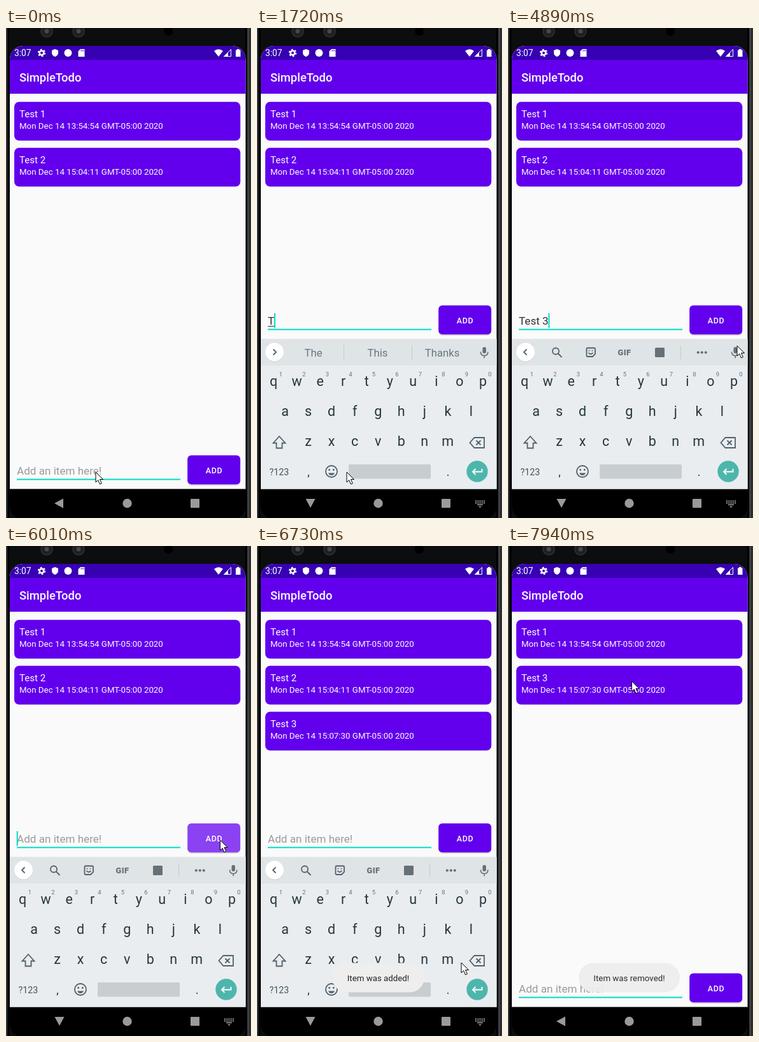
These frames come from a looping animation (385 by 768 pixels, 8000 ms). An HTML page:

```html
<!DOCTYPE html>
<html lang="en">
<head>
<meta charset="utf-8">
<title>SimpleTodo</title>
<style>
  html, body { margin: 0; width: 100%; height: 100%; overflow: hidden; background: #000; }
  svg { display: block; width: 100vw; height: 100vh; font-family: Roboto, sans-serif; }
  .mid { text-anchor: middle; }
  .line { fill: none; stroke: #52616a; stroke-width: 1.8; }
  .white { fill: #fff; }
  .tool { fill: #667177; }
  .key { fill: #26363e; font-size: 21.5px; text-anchor: middle; }
  .num { fill: #65737a; font-size: 9.5px; text-anchor: middle; }
  .word { fill: #6a767c; font-size: 16.7px; text-anchor: middle; }
  .field { font-size: 17.1px; white-space: pre; }
</style>
</head>
<body>
<svg viewBox="0 0 385 768" preserveAspectRatio="none">
  <defs><clipPath id="screen"><rect x="6" y="28" width="370.5" height="742" rx="21"/></clipPath></defs>

  <!-- phone body -->
  <rect width="385" height="768" fill="#0c0d0e"/>
  <path d="M1 0V768" stroke="#35373a" stroke-width="2"/>
  <path d="M382 0V768" stroke="#2c2e30" stroke-width="6"/>
  <path d="M380.500 0V768" stroke="#57595b"/>
  <path d="M4 0V768M377.500 0V768" stroke="#000" stroke-width="3"/>
  <g fill="#1d1f21" stroke="#303234" stroke-width="1.500">
    <circle cx="64" cy="5" r="9"/><circle cx="114" cy="5" r="9"/>
  </g>
  <g fill="#44484b"><circle cx="64" cy="5" r="3.500"/><circle cx="114" cy="5" r="3.500"/></g>
  <circle cx="255" cy="5" r="7" fill="#000"/>

  <g clip-path="url(#screen)">
    <rect x="6" y="28" width="371" height="695" fill="#fafafa"/>
    <rect x="6" y="28" width="371" height="22" fill="#3700b3"/>
    <rect x="6" y="50" width="371" height="53" fill="#6200ee"/>

    <!-- status bar -->
    <g class="white">
      <text x="13" y="44" font-size="13.800">3:07</text>
      <g fill="none" stroke="#fff">
        <circle cx="56" cy="39" r="3.300" stroke-width="2.500"/>
        <circle cx="56" cy="39" r="5.200" stroke-width="2" stroke-dasharray="2.700 2.745"/>
      </g>
      <path d="M77 33l5 2v4q0 4-5 6q-5-2-5-6v-4z"/>
      <circle cx="97.500" cy="39" r="6"/>
      <path d="M117 33h6.500v12h-10v-8.500z"/>
      <path d="M118 34.500v2m2-2v2m2-2v2" stroke="#3700b3"/>
      <path d="M327 36q7-5.500 14 0l-7 9z"/>
      <path d="M353.500 33.500v11h-11z" fill="none" stroke="#fff"/>
      <path d="M349 38v6.500h-6.500z"/>
      <path d="M361 34.500h2v-1.500h3.500v1.500h2v10.500h-7.500z"/>
      <text x="21" y="83.500" font-size="18.400" font-weight="500">SimpleTodo</text>
    </g>

    <g id="items"></g>

    <!-- entry row -->
    <g id="entry">
      <path d="M17 472.500H274" stroke="#03dac5" stroke-width="1.800"/>
      <text id="field" class="field" x="17" y="465"></text>
      <path id="composing" stroke="#333" d=""/>
      <rect id="caret" y="447" width="2" height="23" fill="#03dac5"/>
      <rect x="285.500" y="437" width="82.500" height="45" rx="6" fill="#000" opacity=".16"/>
      <rect id="button" x="285.200" y="434.800" width="83" height="45.400" rx="6"/>
      <text class="mid white" x="327" y="462.500" font-size="12.500" font-weight="500" letter-spacing=".6">ADD</text>
    </g>

    <!-- navigation bar -->
    <rect x="6" y="722.500" width="371" height="46" fill="#000"/>
    <g fill="#9a9a9a">
      <path id="back" d="M76 745l14-7.500v15z"/>
      <circle cx="190.500" cy="745" r="7.200"/>
      <rect x="290" y="738" width="14" height="14" rx="1"/>
      <g id="imeIcon">
        <path d="M343 741.500h15M343 744.500h15" stroke="#9a9a9a" stroke-width="1.800" stroke-dasharray="2 1.250"/>
        <path d="M346 746.500h9v1.600h-9zM348 749.500h5l-2.500 2.500z"/>
      </g>
    </g>

    <!-- keyboard -->
    <g id="keyboard">
      <rect x="6" y="487.500" width="371" height="235" fill="#e9edf0"/>
      <rect x="6" y="487.500" width="371" height="41.500" fill="#dfe4e7"/>
      <circle cx="27.500" cy="509" r="14.500" fill="#b9c0c4" opacity=".6"/>
      <circle cx="27.500" cy="508" r="14.500" class="white"/>
      <path id="chevron" class="line"/>
      <g class="tool">
        <rect x="354.500" y="500" width="5.500" height="10" rx="2.700"/>
        <path d="M351.500 507.500q0 6 5.700 6t5.700-6M357.200 513.500v4" fill="none" stroke="#667177" stroke-width="1.600"/>
      </g>
      <g id="tools" class="tool">
        <circle class="line" cx="75" cy="506.500" r="5"/><path class="line" d="M78.500 510l6 6"/>
        <path class="line" d="M125 501.500h10.500q1.500 0 1.500 1.500v8l-4 4h-8q-1.500 0-1.500-1.500v-10.500q0-1.500 1.500-1.500z"/>
        <path class="line" d="M126.500 509q3.500 4 7 0M127.500 505v1.500m5-1.500v1.500" stroke-width="1.400"/>
        <text class="mid" x="183" y="512.500" font-size="12.800" font-weight="900" letter-spacing=".5">GIF</text>
        <rect x="231" y="501" width="15" height="15" rx="1.500"/>
        <path d="M271.500 498v21" stroke="#c5cbcf"/>
        <circle cx="298.800" cy="508.500" r="2.100"/><circle cx="304.800" cy="508.500" r="2.100"/><circle cx="310.800" cy="508.500" r="2.100"/>
      </g>
      <g id="words">
        <path d="M136.500 497v23M243.500 497v23" stroke="#c5cbcf"/>
        <text class="word" x="88.500" y="515"></text>
        <text class="word" x="189.500" y="515"></text>
        <text class="word" x="291" y="515"></text>
      </g>
      <g id="keys"></g>
      <path class="line" d="M35 640l-9.500 10.500h5v8h9v-8h5z"/>
      <path class="line" d="M341.500 642h15.500v16h-15.500l-7-8zM344.500 646.500l7 7m0-7l-7 7"/>
      <text x="19.500" y="700.500" font-size="14.200" fill="#43535b">?123</text>
      <text class="key" x="81" y="702" style="font-size:18px">,</text>
      <text class="key" x="300" y="702" style="font-size:18px">.</text>
      <circle class="line" cx="117" cy="695" r="9"/>
      <path d="M112 697.500h10q-1.500 3.500-5 3.500t-5-3.500z" fill="#52616a"/>
      <circle cx="113.700" cy="692.500" r="1.400" fill="#52616a"/><circle cx="120.300" cy="692.500" r="1.400" fill="#52616a"/>
      <rect x="144" y="684" width="129" height="22.500" rx="2" fill="#c8cdd0"/>
      <circle cx="346" cy="695" r="16.700" fill="#4db6ac"/>
      <path d="M353.500 691v4.500h-14.500m4.500-4.500l-4.500 4.500l4.500 4.500" fill="none" stroke="#fff" stroke-width="1.900"/>
    </g>

    <g id="toast">
      <rect id="pill" y="653.500" height="46" rx="23" fill="#eeeeee"/>
      <text class="mid" x="190.500" y="682" font-size="13.300" fill="#222"></text>
    </g>
  </g>

  <path id="cursor" d="M0 0V16l3.700-3.500l2.800 6.500l2.800-1.200l-2.800-6.300h5z" fill="#fff" stroke="#000" stroke-width="1"/>
</svg>

<script>
const LOOP = 8000;
const $ = id => document.getElementById(id);
const set = (el, attrs) => { for (const k in attrs) el.setAttribute(k, attrs[k]); };

// Value of the last [time, value] step already reached.
const at = (steps, t) => steps.reduce((value, s) => s[0] <= t ? s[1] : value, steps[0][1]);

const entries = [[0, ''], [1720, 'T'], [2540, 'Te'], [2690, 'Tes'], [3110, 'Test'],
  [3240, 'Test '], [4500, 'Test 3'], [6010, '']];
const suggestions = [[0, ''], [1720, 'The,This,Thanks'], [2540, 'Te,Tell,Team'],
  [2690, 'Test,Tests,Testing'], [3110, 'Test,Testing,Tests'], [3240, 'kit,today,is'],
  [4500, ',,'], [4770, '']];
const caretOn = [[0, 0], [430, 1], [740, 0], [1010, 1], [1440, 0], [1720, 1], [2260, 0],
  [2540, 1], [3800, 0], [4220, 1], [5020, 0], [5450, 1], [6590, 0], [7010, 1], [7420, 0]];
const keyboardShown = [[0, 0], [880, .78], [1010, 1], [7820, 0]];
const thirdItem = [[0, 0], [6140, .82], [6280, 1]];
const buttonFill = [[0, '#6200ee'], [6010, '#8a42f2'], [6140, '#a974f6'], [6280, '#6200ee']];
const toastAlpha = [[0, 0], [6140, .3], [6280, .75], [6430, 1], [7820, .5], [7940, .95]];
const pointer = [[0, [141, 696]], [4650, [175, 660]], [4770, [290, 560]], [4890, [360, 498]],
  [5020, [359, 478]], [5170, [336.5, 461]], [6430, [335, 465]], [6590, [325, 489]],
  [6730, [321, 653]], [6860, [323, 740]], [7010, [300, 754]], [7130, [291, 758]],
  [7280, [291, 790]], [7420, [291, 758]], [7550, [240, 600]], [7820, [194.5, 212]]];

$('items').innerHTML = ['13:54:54', '15:04:11', '15:07:30'].map((time, i) => `
  <g class="white">
    <rect x="13" y="115.800" width="355.300" height="60.700" rx="7.500" fill="#6200ee"/>
    <text x="21" y="140" font-size="15.100">Test ${i + 1}</text>
    <text x="21" y="158" font-size="13.320">Mon Dec 14 ${time} GMT-05:00 2020</text>
  </g>`).join('');

const keyRow = (letters, x, y) => [...letters].map((c, i) =>
  `<text class="key" x="${x + 36.55 * i}" y="${y}">${c}</text>`).join('');
$('keys').innerHTML = keyRow('qwertyuiop', 26, 561) + keyRow('asdfghjkl', 44, 608) +
  keyRow('zxcvbnm', 80.5, 655) + [...'1234567890'].map((n, i) =>
  `<text class="num" x="${37.5 + 36.5 * i}" y="545.5">${n}</text>`).join('');

const items = [...$('items').children];
const wordTexts = [...$('words').querySelectorAll('text')];
const toastText = $('toast').querySelector('text');
const measure = document.createElement('canvas').getContext('2d');

function textWidth(text) {
  measure.font = '17.1px Roboto, sans-serif';
  return measure.measureText(text).width;
}

function drawItems(t) {
  const removed = t >= 7820;
  const rows = [0, 1, removed ? 1 : 2];
  const alphas = [1, removed ? 0 : 1, at(thirdItem, t)];
  items.forEach((item, i) =>
    set(item, { transform: `translate(0 ${rows[i] * 72})`, opacity: alphas[i] }));
}

function drawEntry(t, shown) {
  const text = at(entries, t), width = textWidth(text);
  set($('entry'), { transform: `translate(0 ${shown ? 0 : 235})` });
  $('field').textContent = text || 'Add an item here!';
  set($('field'), { fill: text ? '#333' : '#9b9b9b' });
  set($('composing'), { d: t >= 1720 && t < 3240 ? `M17 467.500h${width}` : '' });
  set($('caret'), { x: 16.7 + width, opacity: at(caretOn, t) });
  set($('button'), { fill: at(buttonFill, t) });
}

function drawKeyboard(t, shown) {
  const words = at(suggestions, t);
  set($('keyboard'), { opacity: shown, transform: `translate(0 ${(1 - shown) * 66})` });
  set($('tools'), { opacity: words ? 0 : 1 });
  set($('words'), { opacity: words ? 1 : 0 });
  words.split(',').forEach((word, i) => wordTexts[i].textContent = word);
  set($('chevron'), { d: words ? 'M25.500 503.500l4.500 4.500l-4.500 4.500' : 'M29.500 503.500l-4.500 4.500l4.500 4.500' });
  set($('back'), { transform: `translate(${shown} 0) rotate(${shown * -90} 83 745)` });
  set($('imeIcon'), { opacity: shown });
}

function drawToast(t) {
  const removed = t >= 7820, half = removed ? 79.5 : 72.5;
  set($('toast'), { opacity: at(toastAlpha, t) });
  set($('pill'), { x: 190.5 - half, width: half * 2 });
  toastText.textContent = removed ? 'Item was removed!' : 'Item was added!';
}

function draw(now) {
  const t = now % LOOP, shown = at(keyboardShown, t);
  drawItems(t);
  drawEntry(t, shown);
  drawKeyboard(t, shown);
  drawToast(t);
  set($('cursor'), { transform: `translate(${at(pointer, t)})` });
}

const start = performance.now();
function tick() {
  draw(performance.now() - start);
  requestAnimationFrame(tick);
}
tick();
</script>
</body>
</html>
```
